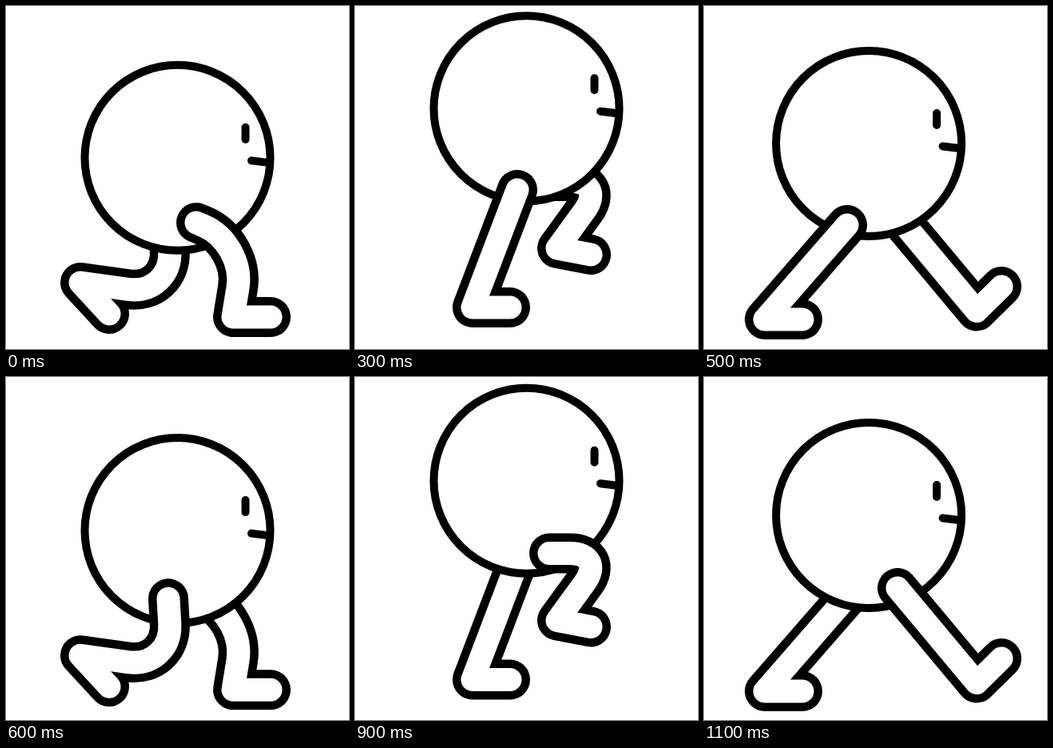
An HTML page that plays this animation: 429x429 px, repeating every 1200 ms.

```html
<!DOCTYPE html>
<html lang="en">
<head>
<meta charset="utf-8">
<title>Walking ball</title>
<style>
  html, body { margin: 0; width: 100%; height: 100%; overflow: hidden; background: #fff; }
  svg { display: block; width: 100vw; height: 100vh; }
  path, circle { fill: none; stroke: #000; stroke-width: 10; stroke-linecap: round; stroke-linejoin: round; }
  circle { fill: #fff; }
  .rim { stroke-width: 50; }
  .skin { stroke: #fff; stroke-width: 29; }
</style>
</head>
<body>
<svg viewBox="0 0 429 429">
  <g id="scene">
    <g id="far"><path class="rim"/><path class="skin"/></g>
    <g id="body">
      <circle r="116"/>
      <path d="M85 -38V-23M92.5 3.5L113 6"/>
    </g>
    <g id="near"><path class="rim"/><path class="skin"/></g>
  </g>
</svg>
<script>
const STEP = 100, COUNT = 12, HALF = COUNT / 2;

const mix = (a, b, k) => a.map((v, i) => v + (b[i] - v) * k);
const toward = (a, b, dist) => mix(a, b, dist / Math.hypot(b[0] - a[0], b[1] - a[1]));

// A leg is straight and its foot flat unless stated; bend is the length of the knee curve.
const leg = ({ hip, heel, knee = mix(hip, heel, .5), foot = [47, 0], bend = 56 }) =>
  ({ hip, knee, heel, foot, bend: [bend] });

const keys = {
  0: leg({ hip: [238, 271], knee: [299, 297], heel: [284, 389] }),
  1: leg({ hip: [238, 232], knee: [299, 293], heel: [237, 376] }),
  3: leg({ hip: [203, 230], heel: [147, 377] }),
  5: leg({ hip: [179, 274], heel: [76, 392] }),
  6: leg({ hip: [203, 275], knee: [208, 362], heel: [93, 346], foot: [36, 39] }),
  7: leg({ hip: [218, 236], knee: [248, 329], heel: [136, 298], foot: [14, 54] }),
  9: leg({ hip: [243, 219], knee: [314, 219], heel: [253, 303], foot: [42, 8], bend: 45 }),
  11: leg({ hip: [242, 263], heel: [341, 381.5], foot: [31, -30.5] })
};

// Steps without a key lie midway between their neighbours.
function pose(i) {
  if (keys[i]) return keys[i];
  const a = keys[i - 1], b = keys[i + 1];
  return Object.fromEntries(Object.keys(a).map(part => [part, mix(a[part], b[part], .5)]));
}

const el = id => document.getElementById(id);

function drawLeg(id, step) {
  const { hip, knee, heel, foot, bend: [bend] } = pose(step % COUNT);
  const from = toward(knee, hip, bend), to = toward(knee, heel, bend);
  const curve = [from, knee, to];
  const [c1, c2] = [mix(curve[0], knee, .55), mix(curve[2], knee, .55)];
  const toe = [heel[0] + foot[0], heel[1] + foot[1]];
  const d = `M${hip}L${from}C${c1} ${c2} ${to}L${heel}L${toe}`;
  for (const path of el(id).children) path.setAttribute("d", d);
}

// Each stride throws the body up, then it falls a little slower and leans back.
function center(s) {
  const gap = s - 2.6;
  return [214.5 - 2.1 * Math.max(0, s - 3) ** 2, 127 + gap * gap * (gap < 0 ? 9.3 : 7.8)];
}

function draw(step) {
  // The second stride sits slightly lower.
  const drop = step < HALF ? 0 : 2 - (step - 7) / 4;
  el("scene").setAttribute("transform", `translate(0 ${drop})`);
  el("body").setAttribute("transform", `translate(${center(step % HALF)})`);
  drawLeg("near", step);
  drawLeg("far", step + HALF);
}

const start = performance.now();
function tick(now) {
  draw(Math.floor(Math.max(0, now - start) / STEP) % COUNT);
  requestAnimationFrame(tick);
}
draw(0);
requestAnimationFrame(tick);
</script>
</body>
</html>
```
